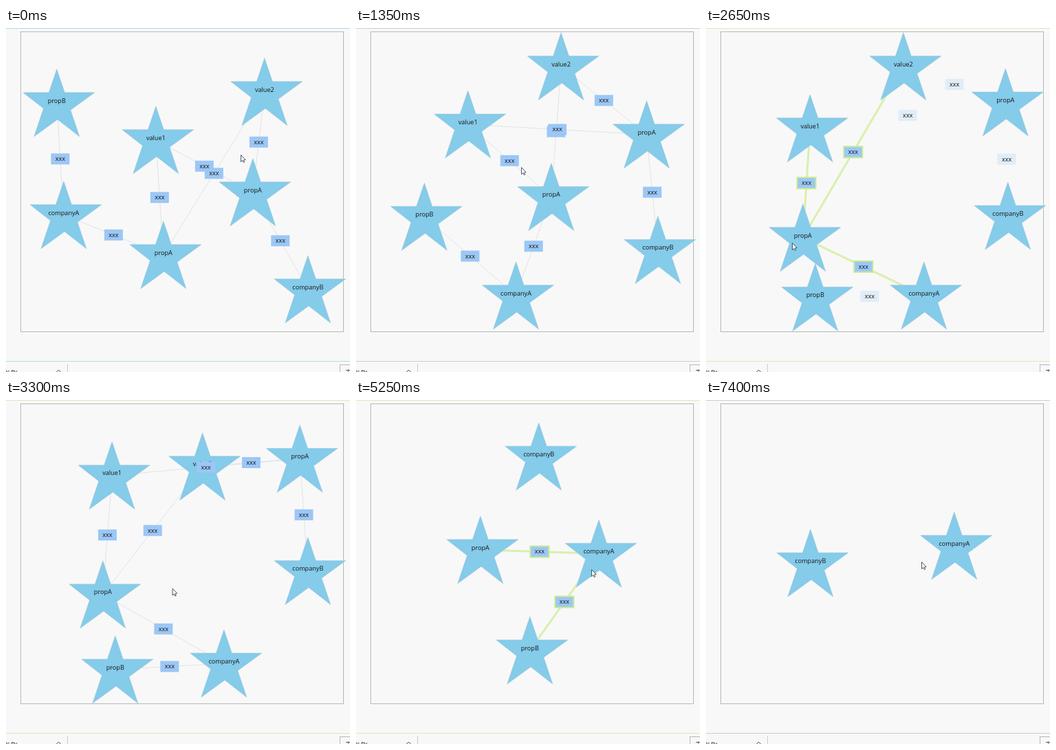
An HTML page with a canvas that plays this animation: 500x500 px, repeating every 7450 ms.

```html
<!DOCTYPE html>
<html lang="en">
<head>
<meta charset="utf-8">
<title>Force graph</title>
<style>
  html, body { margin: 0; width: 100%; height: 100%; overflow: hidden; background: #f8f8f8; }
  canvas { display: block; width: 500px; height: 500px; }
</style>
</head>
<body>
<canvas id="stage" width="500" height="500"></canvas>
<script>
const ctx = document.getElementById('stage').getContext('2d');
const LOOP = 7450, STEP = 50;
const COLLAPSE_B = 4600, COLLAPSE_A = 5700;
const HOVER_RADIUS = 45;
const FONT = '"Open Sans", "Noto Sans", sans-serif';

const clamp = (v, lo, hi) => Math.min(hi, Math.max(lo, v));
const ramp = (t, a, b) => clamp((t - a) / (b - a), 0, 1);
const ease = (t, a, b) => { const u = ramp(t, a, b); return u * u * (3 - 2 * u); };
const decay = (t, tau) => Math.exp(-t / tau);

// Pointer phases: approach, wait, drag, cross over, fold, leave
const BEATS = [0, 750, 1850, 2650, 4150, 5250, LOOP];
const phases = t => BEATS.slice(1).map((end, i) => ease(t, BEATS[i], end));

function pointer(t) {
  const [approach, wait, drag, cross, fold, leave] = phases(t);
  return {
    x: 341 - 101 * approach - 115 * drag + 291 * cross - 74 * fold - 29 * leave,
    y: 184 + 32 * wait + 96 * drag - 96 * cross + 30 * fold - 11 * leave
  };
}

const motion = {
  propB: (t, [first, , , , fold]) => [
    73 + 85 * ease(t, 750, 2400) + 94 * ease(t, 3930, 5250),
    105 + 151 * first + 132 * ease(t, 1000, 2700) - 28 * fold],
  companyA: t => [
    78 + 238 * ease(t, -230, 2410) + 44 * ease(t, 4300, 5600),
    Math.min(385, 268 + 0.16 * t) - 177 * ease(t, 3010, 5660)],
  value1: (t, [, wait, drag, cross]) => [
    217 - 70 * ease(t, 170, 1850) + 10 * ramp(t, 1850, 4150),
    159 - 40 * wait + 23 * drag - 90 * cross],
  propA1: (t, [first, , drag, , fold]) => [
    228 + 55 * first - 143 * drag + 40 * fold,
    326 - 108 * ease(t, 200, 1850) + 83 * drag - 87 * ease(t, 2650, 4620)],
  value2: (t, [, , , cross]) => [
    284 + 91 * decay(t, 700),
    Math.max(52, 89 - 0.05 * t) + 102 * cross],
  propA2: (t, [, , , cross]) => [
    438 - 80 * decay(t, 850) - 25 * cross,
    197 - 0.035 * t + 38 * decay(t, 400)],
  companyB: t => {
    const u = ramp(t, COLLAPSE_B, 6800);
    const y = 370 - 0.038 * Math.min(t, COLLAPSE_B) + 6 * decay(t, 300);
    return [151 + 287 * (1 - u) ** 2.64, y + 38 * u - 160 * Math.sin(Math.PI * u)];
  }
};
const links = [
  ['propB', 'companyA'], ['companyA', 'propA1'], ['propA1', 'value1'], ['propA1', 'value2'],
  ['value1', 'propA2'], ['propA2', 'value2'], ['propA2', 'companyB']
];
const withB = ['value1', 'value2', 'propA2'], withA = ['propB', 'propA1'];

function place(t) {
  const live = {}, beat = phases(t);
  for (const id in motion) {
    if (t >= COLLAPSE_B && withB.includes(id) || t >= COLLAPSE_A && withA.includes(id)) continue;
    const [x, y] = motion[id](t, beat);
    live[id] = { x: clamp(x, 73, 438), y: clamp(y, 52, 388) };
  }
  return live;
}

function trace(points, x, y) {
  ctx.beginPath();
  for (const [px, py] of points) ctx.lineTo(x + px, y + py);
  ctx.closePath();
}

function line(x1, y1, x2, y2, color, width = 1) {
  ctx.strokeStyle = color;
  ctx.lineWidth = width;
  ctx.beginPath();
  ctx.moveTo(x1, y1);
  ctx.lineTo(x2, y2);
  ctx.stroke();
}

function text(str, x, y, size = 9.1) {
  ctx.font = size + 'px ' + FONT;
  ctx.fillStyle = '#151515';
  ctx.textAlign = 'center';
  ctx.fillText(str, x, y);
}

const STAR = [[0, -46], [33, 52], [-49, -12], [55, -12], [-33, 52]];
function star({ x, y }, label) {
  trace(STAR, x, y);
  ctx.strokeStyle = '#cfd6da';
  ctx.lineWidth = 1;
  ctx.stroke();
  ctx.fillStyle = '#85cbea';
  ctx.fill();
  text(label, x, y + 2.7);
}

function tag({ x, y }, state) {
  ctx.fillStyle = state === 'dim' ? '#e0edf7' : '#9bc7f6';
  ctx.fillRect(x - 13.5, y - 8, 27, 16);
  if (state === 'lit') {
    ctx.strokeStyle = '#c9ea8f';
    ctx.lineWidth = 2;
    ctx.strokeRect(x - 13.5, y - 8, 27, 16);
  }
  text('xxx', x, y + 3);
}

const ARROW = [[0, 0], [0, 10], [2.2, 8], [3.8, 11], [5.2, 10.3], [3.8, 7.4], [6.6, 7]];
function cursor({ x, y }) {
  trace(ARROW, x + 0.5, y + 0.5);
  ctx.fillStyle = '#fff';
  ctx.fill();
  ctx.strokeStyle = '#34444c';
  ctx.lineWidth = 0.9;
  ctx.stroke();
}

const BLUE = '#aedde9', GREY = '#cecece', GREEN = '#dce9bd';
const tints = [BLUE, GREY, BLUE, GREEN, GREEN, BLUE, GREEN, GREEN, GREY, GREY];

function chrome(t) {
  const tint = tints[Math.floor(t / 750)];
  line(0, 0.5, 500, 0.5, tint);
  line(0, 484.5, 500, 484.5, tint);
  ctx.strokeStyle = '#b4b8ba';
  ctx.lineWidth = 1;
  ctx.strokeRect(21.5, 5.5, 469, 436);
  ctx.strokeRect(485.5, 489.5, 20, 20);
  line(89.5, 488, 89.5, 500, '#ccc');
  line(494, 497.5, 500, 497.5, '#555');
  line(497.5, 496, 497.5, 500, '#777');
  line(73.5, 500, 76.5, 497, '#444');
  line(76.5, 497, 79.5, 500, '#444');
  text('ic fly', 8, 502, 8);
}

const ink = { plain: '#e2e3e6', dim: '#f7f7f8', lit: '#d8f0ad' };

function draw(t) {
  ctx.fillStyle = '#f8f8f8';
  ctx.fillRect(0, 0, 500, 500);
  chrome(t);

  const live = place(t), tip = pointer(t);
  const hover = Object.keys(live).find(id =>
    Math.hypot(live[id].x - tip.x, live[id].y - tip.y) < HOVER_RADIUS);

  const shown = links.filter(([a, b]) => live[a] && live[b]).map(pair => {
    const [a, b] = pair.map(id => live[id]);
    const state = !hover ? 'plain' : pair.includes(hover) ? 'lit' : 'dim';
    return { a, b, state, mid: { x: (a.x + b.x) / 2, y: (a.y + b.y) / 2 + 3 } };
  }).sort((p, q) => (p.state === 'lit') - (q.state === 'lit'));

  ctx.save();
  ctx.translate(0.8, 0.8);
  for (const { a, b, state } of shown) {
    line(a.x, a.y + 3, b.x, b.y + 3, ink[state], state === 'lit' ? 3 : 1);
  }
  for (const id in live) star(live[id], id.replace(/^(prop[AB]).*/, '$1'));
  for (const { mid, state } of shown) tag(mid, state);
  ctx.restore();
  cursor(tip);
}

const start = performance.now();
function tick() {
  const t = (performance.now() - start) % LOOP;
  draw(Math.floor(t / STEP) * STEP);
  requestAnimationFrame(tick);
}
tick();
</script>
</body>
</html>
```
